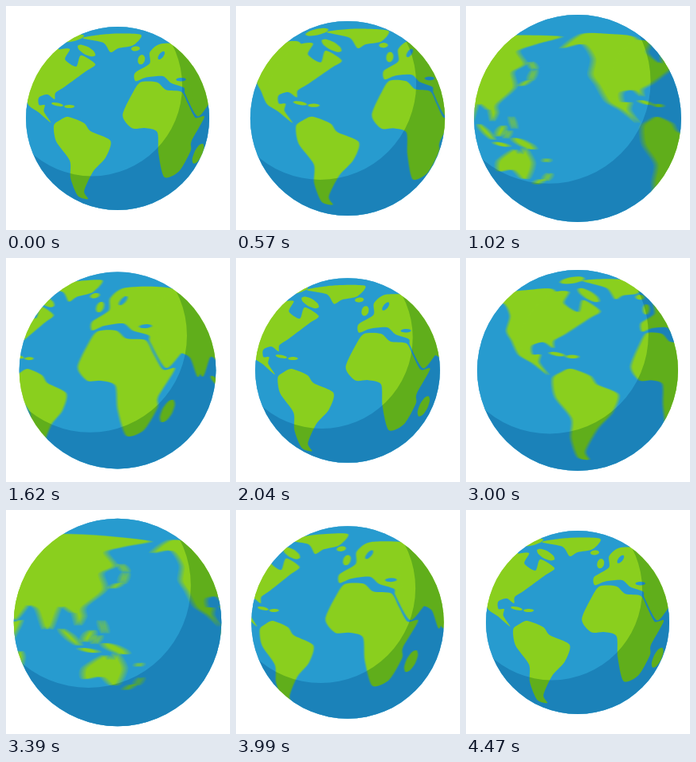
An HTML page with a canvas for the animation above (4.5 s loop, 281 by 281 pixels).

```html
<!DOCTYPE html>
<html lang="en">
<head>
<meta charset="utf-8">
<title>Spinning globe</title>
<style>
  html, body { margin: 0; overflow: hidden; background: #fff; }
  canvas { display: block; }
</style>
</head>
<body>
<canvas id="stage" width="281" height="281"></canvas>
<script>
const SIZE = 281, CX = 140, CY = 141;
const TURN = 2250;      // ms per revolution
const MAP_WIDTH = 4.08; // map period in globe radii
const LENS = 0.166;     // bulge of the flat map inside the disc
const OCEAN = '#299dd0', LAND = '#8bd020', SHADE = 'rgb(177,214,228)';
const BLUR_STEPS = 5, SHUTTER = 16;

// The globe swells in the middle of each turn, while it spins fastest.
function radiusAt(time) {
  return 115 + 15.3 * Math.abs(Math.sin(Math.PI * time / TURN)) ** 2.3;
}

function offsetAt(time) {
  const turns = time / TURN, a = 2 * Math.PI * turns;
  const eased = turns - 0.183 * Math.sin(a) + 0.025 * Math.sin(2 * a)
    - 0.021 * (1 - Math.cos(a));
  return MAP_WIDTH * (eased - Math.floor(eased));
}

// Coasts are sketched as seen on the globe from one of four sides.
const atlantic = { radius: 115, offset: 0 };
const africa = { radius: 123.5, offset: -0.48 };
const pacific = { radius: 130, offset: 1.42 };
const asia = { radius: 130, offset: 1.94 };
const shapes = [];

function coast(view, coords, color = LAND) {
  const points = [];
  for (let i = 0; i < coords.length; i += 2) {
    const x = (coords[i] - CX) / view.radius, y = (coords[i + 1] - CY) / view.radius;
    const stretch = 1 + LENS * (x * x + y * y);
    points.push([x * stretch - view.offset, y * stretch]);
  }
  shapes.push({ points, color });
}

// Oval from one end to the other.
function oval(view, x1, y1, x2, y2, width, color) {
  const dx = (x2 - x1) / 2, dy = (y2 - y1) / 2, w = width / 2 / Math.hypot(dx, dy);
  const coords = [];
  for (let i = 0; i < 8; i++) {
    const c = Math.cos(i * Math.PI / 4), s = Math.sin(i * Math.PI / 4) * w;
    coords.push((x1 + x2) / 2 + dx * c - dy * s, (y1 + y2) / 2 + dy * c + dx * s);
  }
  coast(view, coords, color);
}

// North America, Greenland, Caribbean
coast(pacific, [121,53, 146,35, 180,35, 214,40, 226,70, 222,100, 197,107, 197,120, 207,121,
  206,131, 217,147, 196,131, 178,120, 166,100, 157,86, 160,66, 147,48]);
coast(atlantic, [28,108, 45,74, 64,56, 80,54, 74,67, 88,76, 94,62, 112,73, 100,82, 74,101,
  62,109, 61,117, 52,111, 42,114, 36,122]);
coast(atlantic, [96,40, 130,35, 169,36, 160,49, 141,53, 131,58, 122,46]);
oval(atlantic, 90, 50, 112, 62, 10);
oval(atlantic, 72, 44, 98, 37, 7);
oval(atlantic, 157, 54, 168, 53, 6);
oval(atlantic, 57, 122, 72, 125, 4);
oval(atlantic, 73, 126, 86, 126, 4);
// South America
coast(atlantic, [60,150, 68,143, 78,139, 98,147, 106,157, 131,169, 125,190, 109,208,
  98,232, 103,242, 90,238, 81,216, 80,194, 63,170]);
// Africa and Madagascar
coast(africa, [89,137, 103,106, 114,92, 137,91, 150,101, 174,103, 184,120, 196,140,
  211,139, 190,174, 189,188, 172,216, 150,223, 139,190, 136,160, 118,154, 101,154]);
oval(africa, 194, 206, 209, 178, 13);
// Europe and western Asia
coast(africa, [107,91, 107,80, 128,66, 130,50, 150,37, 210,39, 245,75, 268,130, 256,124,
  246,149, 233,123, 222,117, 200,138, 180,106, 178,97, 158,91, 146,82, 122,85]);
oval(africa, 114, 68, 120, 55, 9);
oval(africa, 141, 59, 151, 48, 6, OCEAN);
oval(africa, 166, 86, 182, 85, 5, OCEAN);
// Eastern Asia and Japan
coast(asia, [8,120, 8,70, 40,34, 100,31, 180,39, 150,46, 126,53, 137,70, 120,80, 124,100,
  98,122, 98,134, 90,145, 82,122, 62,122, 49,150, 38,124, 22,118]);
oval(asia, 143, 68, 152, 78, 6);
oval(asia, 151, 78, 145, 93, 7);
oval(asia, 145, 92, 131, 98, 5);
// Islands of south-east Asia
oval(asia, 119, 138, 125, 155, 6);
oval(asia, 68, 149, 93, 170, 8);
oval(asia, 92, 174, 116, 178, 5);
oval(asia, 97, 165, 110, 151, 10);
oval(asia, 110, 168, 118, 157, 6);
oval(asia, 121, 168, 153, 180, 9);
// Australia and New Zealand
coast(asia, [98,198, 123,182, 132,188, 138,179, 149,198, 141,218, 131,219, 119,209, 98,212]);
oval(asia, 148, 225, 161, 219, 5);
oval(asia, 162, 220, 171, 210, 6);
oval(asia, 163, 195, 171, 193, 5);

const ctx = document.getElementById('stage').getContext('2d');
const layer = document.createElement('canvas');
layer.width = layer.height = SIZE;
const map = layer.getContext('2d');

// Map position to screen, through the lens.
function project(x, y, radius) {
  const flat = Math.hypot(x, y) || 1e-6;
  let s = Math.min(flat, 1.5);
  for (let i = 0; i < 4; i++) {
    s -= (s + LENS * s ** 3 - flat) / (1 + 3 * LENS * s * s);
  }
  const scale = s / flat * radius;
  return [CX + x * scale, CY + y * scale];
}

// Closed smooth curve through all points.
function fillSmooth(points) {
  const n = points.length, at = i => points[(i + n) % n];
  const handle = (i, side) =>
    [0, 1].map(k => at(i)[k] + side * 0.13 * (at(i + 1)[k] - at(i - 1)[k]));
  map.beginPath();
  map.moveTo(...points[0]);
  for (let i = 0; i < n; i++) {
    map.bezierCurveTo(...handle(i, 1), ...handle(i + 1, -1), ...at(i + 1));
  }
  map.fill();
}

function drawMap(offset, radius) {
  map.fillStyle = OCEAN;
  map.fillRect(0, 0, SIZE, SIZE);
  for (const { points, color } of shapes) {
    map.fillStyle = color;
    for (let copy = -2; copy <= 1; copy++) {
      const shift = offset + copy * MAP_WIDTH;
      if (points.some(p => Math.abs(p[0] + shift) < 1.25)) {
        fillSmooth(points.map(([x, y]) => project(x + shift, y, radius)));
      }
    }
  }
}

function disc(x, y, radius) {
  ctx.moveTo(x + radius, y);
  ctx.arc(x, y, radius, 0, 2 * Math.PI);
}

function draw(now) {
  const radius = radiusAt(now);
  ctx.fillStyle = '#fff';
  ctx.fillRect(0, 0, SIZE, SIZE);
  ctx.save();
  ctx.beginPath();
  disc(CX, CY, radius);
  ctx.clip();

  // Average several moments for motion blur.
  for (let i = 0; i < BLUR_STEPS; i++) {
    drawMap(offsetAt(now + SHUTTER * (i / (BLUR_STEPS - 1) - 0.5)), radius);
    ctx.globalAlpha = 1 / (i + 1);
    ctx.drawImage(layer, 0, 0);
  }

  ctx.globalAlpha = 1;
  ctx.globalCompositeOperation = 'multiply';
  ctx.fillStyle = SHADE;
  ctx.beginPath();
  ctx.rect(0, 0, SIZE, SIZE);
  disc(CX - 0.28 * radius, CY - 0.355 * radius, 0.985 * radius);
  ctx.fill('evenodd');
  ctx.restore();
}

const start = performance.now();
function frame() {
  draw(performance.now() - start);
  requestAnimationFrame(frame);
}
frame();
</script>
</body>
</html>
```
